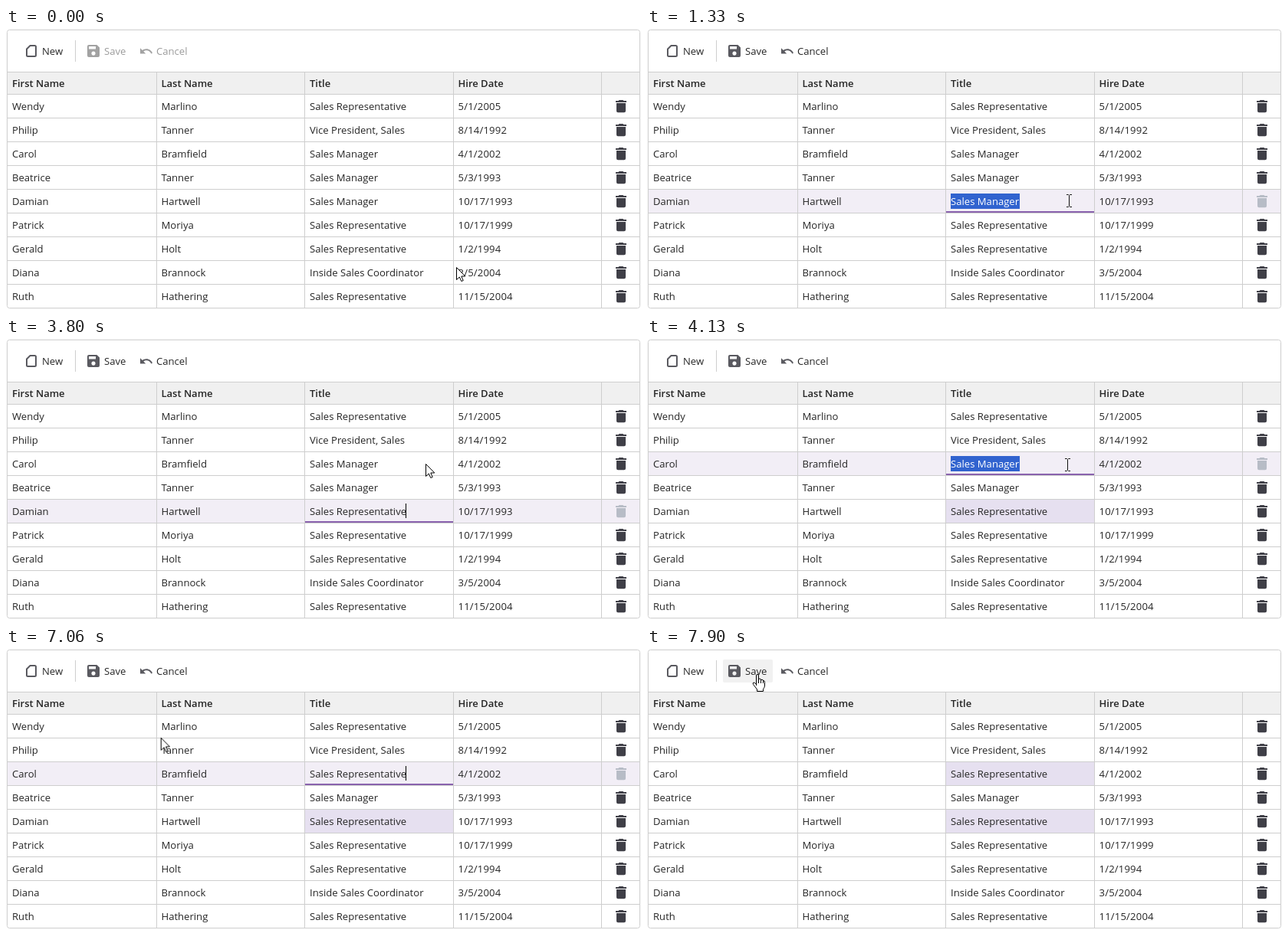
Recreate the animation shown at these times as an HTML page. Size 828 by 368 pixels, loop 8 s.

```html
<!DOCTYPE html>
<html lang="en">
<head>
<meta charset="utf-8">
<title>Editable grid</title>
<style>
html, body { margin: 0; width: 100%; height: 100%; overflow: hidden; background: #fff; }
svg { display: block; width: 828px; height: 368px; }
text { font: 13.1px "Open Sans", "Noto Sans", sans-serif; fill: #262626; white-space: pre; }
.head text { font-weight: 600; font-size: 13px; }
.date { letter-spacing: .17px; }
.line { fill: none; stroke: #cecece; }
.bin { fill: #3f3f47; }
.off { fill: #b7bcc6; }
.band { fill: #f2eef6; }
.changed { fill: #e6e0f0; }
.under { fill: #8a62ae; }
.mark { fill: #3163cf; }
.picked { fill: #fff; }
.caret { fill: #000; }
.tool { --ink: #5a5a60; }
.tool .icon { fill: #5a5a60; }

/* Everything runs on one 8 s clock; 1% = 80 ms. */
.t { animation: 8s step-end infinite; }
.hide { visibility: hidden; }
.ready text { animation: inkText 8s step-end infinite; }
.ready .icon { animation: inkIcon 8s step-end infinite; }
@keyframes inkText { 0% { fill: #9b9b9b; } 16.25%, 100% { fill: #262626; } }
@keyframes inkIcon { 0% { fill: #a2a2a2; } 16.25%, 100% { fill: #5a5a60; } }

.editA { animation-name: editA; }
.selA { animation-name: selA; }
.oldA { animation-name: oldA; }
.newA { animation-name: newA; }
.caretA { animation-name: caretA; }
.doneA { animation-name: doneA; }
@keyframes editA { 0%, 50.75%, 100% { visibility: hidden; } 16.25% { visibility: visible; } }
@keyframes selA { 0%, 31.25%, 100% { visibility: hidden; } 16.625% { visibility: visible; } }
@keyframes oldA { 0% { visibility: visible; } 31.25%, 100% { visibility: hidden; } }
@keyframes newA { 0% { visibility: hidden; } 31.25%, 100% { visibility: visible; } }
@keyframes caretA { 0%, 37.875%, 50.75%, 100% { visibility: hidden; } 31.25%, 44.5% { visibility: visible; } }
@keyframes doneA { 0% { visibility: hidden; } 50.75%, 100% { visibility: visible; } }

.editB { animation-name: editB; }
.selB { animation-name: selB; }
.oldB { animation-name: oldB; }
.newB { animation-name: newB; }
.caretB { animation-name: caretB; }
.doneB { animation-name: doneB; }
@keyframes editB { 0%, 98.25%, 100% { visibility: hidden; } 50.75% { visibility: visible; } }
@keyframes selB { 0%, 68.75%, 100% { visibility: hidden; } 51.625% { visibility: visible; } }
@keyframes oldB { 0% { visibility: visible; } 68.75%, 100% { visibility: hidden; } }
@keyframes newB { 0% { visibility: hidden; } 68.75%, 100% { visibility: visible; } }
@keyframes caretB {
  0%, 75.375%, 88.625%, 98.25%, 100% { visibility: hidden; }
  68.75%, 82%, 95% { visibility: visible; }
}
@keyframes doneB { 0% { visibility: hidden; } 98.25%, 100% { visibility: visible; } }

.hover { fill: #f1f1f1; animation-name: hand; }
.arrow { animation-name: arrow; }
.beam { animation-name: beam; }
.hand { animation-name: hand; }
@keyframes arrow {
  0%, 44%, 84% { visibility: visible; }
  16.625%, 51.625%, 93.5%, 100% { visibility: hidden; }
}
@keyframes beam {
  0%, 44%, 84%, 100% { visibility: hidden; }
  16.625%, 51.625% { visibility: visible; }
}
@keyframes hand { 0% { visibility: hidden; } 93.5%, 100% { visibility: visible; } }

.pointer { animation: travel 8s linear infinite; }
@keyframes travel {
  0%, 5.375% { transform: translate(587px, 312px); }
  8% { transform: translate(577px, 286px); }
  10.5% { transform: translate(549px, 241px); }
  11.9% { transform: translate(542px, 228px); }
  13.25%, 42.875% { transform: translate(550px, 225px); }
  44% { transform: translate(551px, 208px); }
  45.5% { transform: translate(549px, 180px); }
  47.5%, 51.5% { transform: translate(547px, 164px); }
  51.625%, 82% { transform: translate(548px, 165px); }
  83.5% { transform: translate(505px, 175px); }
  85.2% { transform: translate(389px, 174px); }
  86.7% { transform: translate(290px, 150px); }
  88.25% { transform: translate(202px, 117px); }
  90% { transform: translate(150px, 84px); }
  92%, 92.5% { transform: translate(133px, 56px); }
  93.5% { transform: translate(138px, 45px); }
  95%, 100% { transform: translate(143px, 34px); }
}
</style>
</head>
<body>
<svg viewBox="0 0 828 368" xmlns="http://www.w3.org/2000/svg">
  <defs>
    <path id="bin" d="M4.5 0h5l1 1H14v2H0V1h3.500zM1 4h12v10.200a2 2 0 0 1-2 2H3a2 2 0 0 1-2-2z"/>
  </defs>

  <rect class="hover t hide" x="99" y="15" width="65" height="30" rx="2"/>
  <g class="tool">
    <path d="M31.500 23H37.500a1.500 1.500 0 0 1 1.500 1.500V35.500a1.500 1.500 0 0 1-1.500 1.500H28.500a1.500 1.500 0 0 1-1.500-1.500V27.500z"
      fill="none" stroke="#5a5a60" stroke-width="2"/>
    <text x="47" y="35">New</text>
  </g>
  <path class="line" d="M90.500 16V44"/>
  <g class="tool ready">
    <path class="icon" fill-rule="evenodd" d="M108 22H118.500L122 25.500V36a2 2 0 0 1-2 2H108a2 2 0 0 1-2-2V24a2 2 0 0 1 2-2zM108 24V27.500H117V24zM114 30.500a2.600 2.600 0 1 0 .01 0z"/>
    <text x="128" y="35">Save</text>
    <path class="icon" d="M183 27.200C181 27.200 179.200 27.900 177.800 29.100L175 26.300V33.500H182.200L179.300 30.600C180.400 29.700 181.700 29.200 183.200 29.200C186 29.200 188.300 31 189.200 33.500L191 32.800C189.900 29.500 186.700 27.200 183 27.200z"/>
    <text x="196" y="35">Cancel</text>
  </g>

  <g id="grid"></g>

  <g class="pointer">
    <path class="arrow t" d="M.5 .5V16.500L4.300 13L6.800 18.500L9.200 17.500L6.800 12H11.800z" fill="#fff" stroke="#000"/>
    <path class="beam t hide" d="M-3 -7.500H-.5L.5 -6.500L1.500 -7.500H4M.5 -6.500V7.500M-3 8.500H-.5L.5 7.500L1.500 8.500H4" fill="none" stroke="#111"/>
    <path class="hand t hide" d="M-.5 15V2Q-.5 .5 1 .5T2.500 2V8V6.500Q4 5.300 5.500 6.800V8Q7 6.600 8.500 8V9Q10.500 8 10.500 10.500V15Q10.500 17.500 8.500 19.500V22.500H.5V20L-4.500 13.500Q-5.500 11.500 -4 11T-.5 13.500M2.500 8V12M5.500 8V12M8.500 9V12"
      fill="#fff" stroke="#000"/>
  </g>
</svg>
<script>
const REP = 'Sales Representative', MGR = 'Sales Manager';
const people = [
  ['Wendy', 'Marlino', REP, '5/1/2005'],
  ['Philip', 'Tanner', 'Vice President, Sales', '8/14/1992'],
  ['Carol', 'Bramfield', MGR, '4/1/2002'],
  ['Beatrice', 'Tanner', MGR, '5/3/1993'],
  ['Damian', 'Hartwell', MGR, '10/17/1993'],
  ['Patrick', 'Moriya', REP, '10/17/1999'],
  ['Gerald', 'Holt', REP, '1/2/1994'],
  ['Diana', 'Brannock', 'Inside Sales Coordinator', '3/5/2004'],
  ['Ruth', 'Hathering', REP, '11/15/2004']
];
const edits = { 4: 'A', 2: 'B' };
const colX = [8, 202.5, 396, 589.5];
const rowTop = i => 87 + 31 * i;

const text = (x, y, s, cls = '') => `<text x="${x}" y="${y}" class="${cls}">${s}</text>`;
const rect = (x, y, w, h, cls) => `<rect x="${x}" y="${y}" width="${w}" height="${h}" class="${cls}"/>`;
const bin = (y, cls) => `<use href="#bin" x="795" y="${y + 7}" class="${cls}"/>`;

// Backgrounds that sit below the grid lines
const fills = Object.entries(edits).map(([i, k]) =>
  rect(2, rowTop(i), 824, 30, `band t hide edit${k}`) +
  rect(390, rowTop(i), 193, 30, `changed t hide done${k}`)).join('');

function editor(y, k) {
  const base = y + 20;
  return text(396, base, MGR, `t old${k}`) +
    text(396, base, REP, `t hide new${k}`) +
    rect(390, y + 28, 193, 2, `under t hide edit${k}`) +
    `<g class="t hide sel${k}">` + rect(396, y + 5, 90, 20, 'mark') + text(396, base, MGR, 'picked') + '</g>' +
    rect(521, y + 5, 1, 19, `caret t hide caret${k}`);
}

function row(cells, i) {
  const y = rowTop(i), k = edits[i];
  const body = cells.map((s, c) =>
    k && c === 2 ? editor(y, k) : text(colX[c], y + 20, s, c === 3 ? 'date' : '')).join('');
  const cover = k ? `<g class="t hide edit${k}">` + rect(794, y + 5, 16, 21, 'band') + bin(y, 'off') + '</g>' : '';
  return body + bin(y, 'bin') + cover;
}

let lines = 'M1 57.500H827M1 86.500H827';
for (let i = 1; i < 9; i++) lines += `M1 ${rowTop(i) - .5}H827`;
for (const x of [196.5, 389.5, 583.5, 776.5]) lines += `M${x} 57V365`;

const titles = ['First Name', 'Last Name', 'Title', 'Hire Date'];
document.getElementById('grid').innerHTML =
  '<rect x="2" y="58" width="824" height="28" fill="#f0f0f0"/>' + fills +
  `<path class="line" d="${lines}"/><rect class="line" x="1.5" y="2.500" width="825" height="363" rx="3"/>` +
  '<g class="head">' + titles.map((s, c) => text(colX[c], 77, s)).join('') + '</g>' +
  people.map(row).join('');
</script>
</body>
</html>
```
